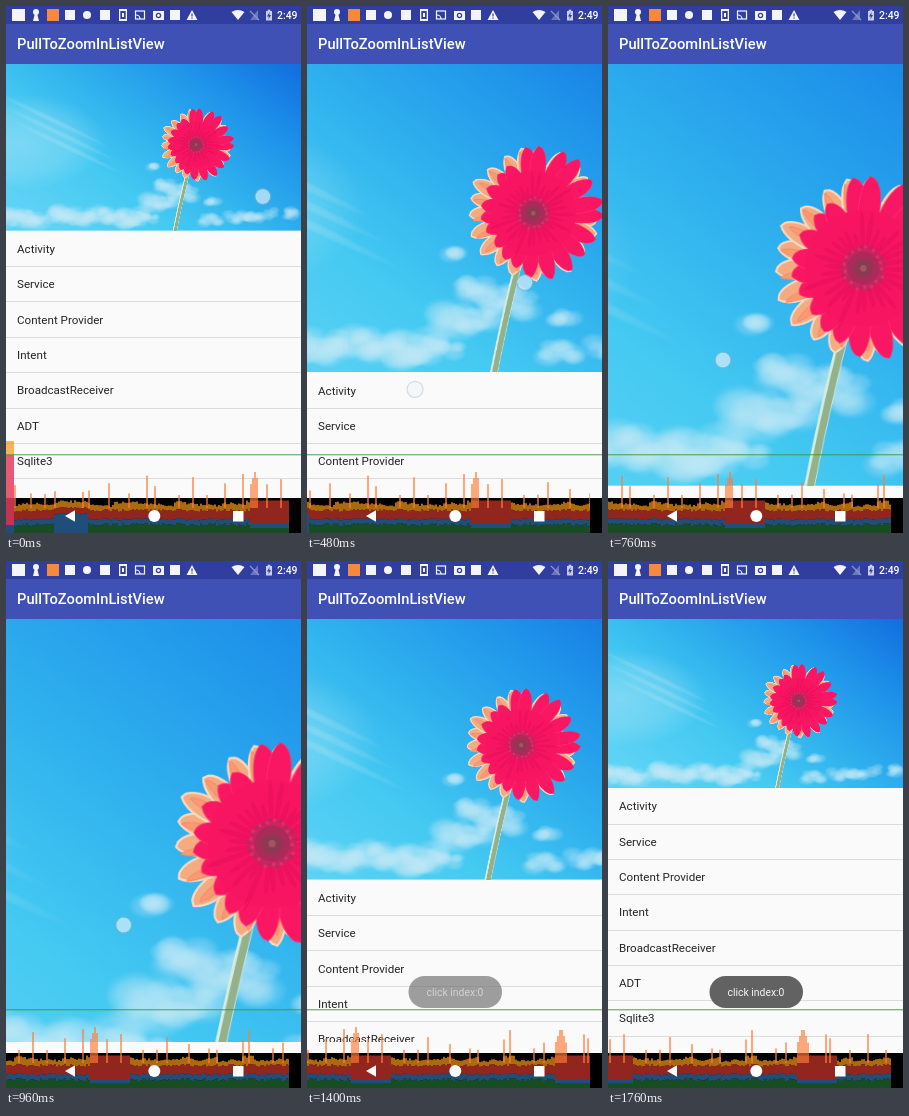
An HTML page with a canvas for the animation above (1.8 s loop, 295 by 527 pixels).

```html
<!DOCTYPE html>
<html lang="en">
<head>
<meta charset="utf-8">
<title>PullToZoomInListView</title>
<style>
html, body { margin: 0; width: 100%; height: 100%; overflow: hidden; background: #000; }
canvas { display: block; width: 295px; height: 527px; }
</style>
</head>
<body>
<canvas id="stage" width="295" height="527"></canvas>
<script>
const W = 295, H = 527, LOOP = 1800, TAU = Math.PI * 2;
const TOP = 58, LIST_END = 481, NAV = 492, PHOTO_H = 166.5, ROW = 35.35;
const RELEASE = 1205, BOUNCE = 903, PEAK = 487;
const FONT = 'Roboto, "Noto Sans", sans-serif';
const ROWS = ['Activity', 'Service', 'Content Provider', 'Intent', 'BroadcastReceiver', 'ADT', 'Sqlite3'];

const g = document.getElementById('stage').getContext('2d');

const noise = n => {
  const v = Math.sin(n * 127.1 + 11.7) * 43758.5453;
  return v - Math.floor(v);
};
const clamp = v => Math.max(0, Math.min(1, v));
const mix = (a, b, k) => a + (b - a) * k;

// Piecewise linear value through [time, value] points.
function track(points, t) {
  let [t0, v0] = points[0];
  for (const [t1, v1] of points) {
    if (t <= t1) return t1 === t0 ? v1 : mix(v0, v1, (t - t0) / (t1 - t0));
    t0 = t1; v0 = v1;
  }
  return v0;
}

function rect(c, color, x, y, w, h) {
  c.fillStyle = color;
  c.fillRect(x, y, w, h);
}

function disc(c, color, x, y, r) {
  c.fillStyle = color;
  c.beginPath();
  c.arc(x, y, r, 0, TAU);
  c.fill();
}

function poly(c, color, ...p) {
  c.fillStyle = color;
  c.beginPath();
  for (let i = 0; i < p.length; i += 2) c.lineTo(p[i], p[i + 1]);
  c.closePath();
  c.fill();
}

function text(str, x, y, size, color, weight = 400, align = 'left') {
  g.font = `${weight} ${size}px ${FONT}`;
  g.textAlign = align;
  g.fillStyle = color;
  g.fillText(str, x, y);
}

// ---- Photo, painted once at triple size ----
function puff(c, x, y, rx, ry, alpha) {
  c.save();
  c.translate(x, y);
  c.scale(rx, ry);
  const grad = c.createRadialGradient(0, 0, 0, 0, 0, 1);
  grad.addColorStop(0, `rgba(196,233,246,${alpha})`);
  grad.addColorStop(0.6, `rgba(190,231,246,${alpha * 0.65})`);
  grad.addColorStop(1, 'rgba(190,233,248,0)');
  c.fillStyle = grad;
  c.fillRect(-1, -1, 2, 2);
  c.restore();
}

// Puffs scattered over an ellipse, one for about every 40 square units.
function cloud(c, x, y, rx, ry) {
  const count = 4 + rx * ry / 13;
  for (let i = 0; i < count; i++) {
    const k = x + y + i * 5, a = noise(k) * TAU, d = Math.sqrt(noise(k + 1)) * 0.85;
    const r = 3 + noise(k + 2) * Math.min(7, ry * 0.7);
    puff(c, x + Math.cos(a) * d * rx, y + Math.sin(a) * d * ry, r * 1.5, r, 0.42);
  }
}

function petal(c, angle, len, half, fill, edge, width) {
  c.save();
  c.rotate(angle);
  c.beginPath();
  c.moveTo(3, 0);
  c.bezierCurveTo(len * 0.4, -half, len * 0.85, -half * 1.5, len, -half * 0.15);
  c.lineTo(len * 0.98, half * 0.25);
  c.bezierCurveTo(len * 0.85, half * 1.5, len * 0.4, half, 3, 0);
  c.fillStyle = fill;
  c.fill();
  c.strokeStyle = edge;
  c.lineWidth = width;
  c.stroke();
  c.restore();
}

function ring(c, count, seed, paint) {
  for (let i = 0; i < count; i++) paint((i + noise(seed + i) * 0.45) / count * TAU, noise(seed + i + 50), i);
}

function flower(c) {
  for (const [color, width, dx] of [['#d5ecdf', 4.2, 0], ['#93b28c', 2.8, 0.4]]) {
    c.strokeStyle = color;
    c.lineWidth = width;
    c.beginPath();
    c.moveTo(184 + dx, 100);
    c.quadraticCurveTo(176 + dx, 130, 168.5 + dx, 168);
    c.stroke();
  }
  c.save();
  c.translate(190, 80.6);
  ring(c, 21, 4, (a, n) => petal(c, a, 34 + n * 3.4, 4.2, '#f5ab80', '#f9d9c2', 0.8));
  ring(c, 21, 30, (a, n) => petal(c, a, 31 + n * 3, 1.6, '#fb9a72', 'rgba(240,110,90,.4)', 0.4));
  // Front petals reach the rim on the right and stop short on the left.
  ring(c, 21, 9, (a, n) => {
    const reach = 27 + 8.5 * clamp((Math.cos(a) + 0.55) / 0.55);
    petal(c, a, reach + n * 3, 4.3, '#f91663', 'rgba(250,50,110,.8)', 0.4);
  });
  disc(c, '#f71562', 0, 0, 23);
  ring(c, 30, 70, (a, n) => petal(c, a, 14 + n * 12, 0.8, 'rgba(220,14,88,.35)', 'rgba(220,14,88,.2)', 0.3));
  disc(c, '#cf2260', 0, 0, 8.6);
  ring(c, 34, 90, (a, n, i) => {
    const r = 6.8 + n * 2.2;
    disc(c, i % 2 ? '#b52a5c' : '#dd3068', Math.cos(a) * r, Math.sin(a) * r, 0.7);
  });
  disc(c, '#aa2b59', 0, 0, 6.4);
  disc(c, '#8c3a53', 0, 0, 3.6);
  disc(c, '#a05560', 0, 0, 1.3);
  c.restore();
}

function makePhoto() {
  const cv = document.createElement('canvas');
  cv.width = W * 3;
  cv.height = Math.round(PHOTO_H * 3);
  const c = cv.getContext('2d');
  c.scale(3, 3);
  const sky = c.createLinearGradient(70, 175, 235, -40);
  ['#5cd2f5', '#45caf2', '#2fb0ee', '#1f93ea', '#1270e0'].forEach((s, i) => sky.addColorStop(i / 4, s));
  rect(c, sky, 0, 0, W, PHOTO_H);
  puff(c, 15, 78, 85, 48, 0.4);
  c.save();
  c.translate(55, 70);
  c.rotate(0.45);
  for (let i = -1; i < 2; i++) puff(c, i * 12, i * 9, 62, 3, 0.28);
  c.restore();
  // Main cloud, its small neighbours, then the low bank.
  cloud(c, 163, 120, 15, 6);
  cloud(c, 177, 129, 17, 8);
  cloud(c, 152, 138, 18, 8);
  cloud(c, 148, 103, 4, 3);
  cloud(c, 206, 137, 6, 3);
  for (let x = 5; x < 140; x += 22) cloud(c, x, 155 - noise(x) * 5, 17, 8);
  for (let x = 205; x < W; x += 24) cloud(c, x, 156 - (x - 205) * 0.1, 15, 5);
  flower(c);
  return cv;
}
const photo = makePhoto();

// ---- Motion ----
const PULL = [[0, PHOTO_H], [280, 241], [480, 308], [760, 422], [1040, 481], [1200, PEAK]];

function photoHeight(t) {
  if (t < RELEASE) return track(PULL, t);
  const left = 1 - clamp((t - RELEASE) / BOUNCE);
  return PHOTO_H + (PEAK - PHOTO_H) * left ** 5;
}

function touch(t, t0, t1, x0, y0, x1, y1) {
  if (t < t0 || t > t1) return;
  const k = (t - t0) / (t1 - t0), x = mix(x0, x1, k), y = mix(y0, y1, k);
  disc(g, 'rgba(238,246,250,.62)', x, y, 7.5);
  g.strokeStyle = 'rgba(160,175,185,.4)';
  g.lineWidth = 1.2;
  g.beginPath();
  g.arc(x, y, 8, 0, TAU);
  g.stroke();
}

// Two fingers take turns pulling down.
function drawTouches(t) {
  touch(t, 0, 300, 257, 190, 202, 352);
  touch(t, 280, 500, 77, 249, 111, 396);
  touch(t, 480, 700, 218, 276, 200, 385);
  touch(t, 640, 760, 112, 250, 115, 354);
  touch(t, 760.1, RELEASE, 115, 354, 121, 376);
}

// ---- Screen parts ----
function drawList(t) {
  const h = photoHeight(t), s = h / PHOTO_H, edge = TOP + h;
  rect(g, '#fafafa', 0, TOP, W, NAV - TOP);
  g.save();
  g.beginPath();
  g.rect(0, TOP, W, LIST_END - TOP);
  g.clip();
  g.drawImage(photo, W / 2 - W * s / 2, TOP, W * s, h);
  ROWS.forEach((name, i) => {
    const y = edge + i * ROW;
    text(name, 11, y + 22.2, 11.6, '#242424');
    rect(g, '#dcdedd', 0, Math.round(y + ROW), W, 1);
  });
  g.restore();
}

function drawStatus() {
  const w = '#f4f5fb', bar = '#303f9f';
  rect(g, '#3f51b5', 0, 0, W, TOP);
  rect(g, bar, 0, 0, W, 18);
  g.strokeStyle = w;
  g.lineWidth = 1.2;
  // plain marks
  rect(g, w, 6, 3, 13, 12);
  rect(g, '#f58a3c', 41, 3, 12, 12);
  for (const x of [59, 94, 164]) rect(g, w, x, 4, 10, 10);
  disc(g, w, 81, 9, 4);
  // keyhole
  disc(g, w, 30, 6, 3);
  poly(g, w, 29, 7, 31, 7, 33, 15, 27, 15);
  // phone
  rect(g, w, 113, 3, 8, 12);
  rect(g, bar, 114.3, 5, 5.4, 8);
  rect(g, w, 116, 7, 2, 4);
  // cast
  g.strokeRect(129.5, 5, 9, 8);
  g.beginPath();
  g.arc(130, 13, 4, -Math.PI / 2, 0);
  g.stroke();
  // camera
  rect(g, w, 147, 5, 11, 9);
  disc(g, bar, 152.5, 9.5, 2.7);
  disc(g, w, 152.5, 9.5, 1.4);
  // warning
  poly(g, w, 186, 4, 191.5, 14, 180.5, 14);
  rect(g, bar, 185.4, 7.5, 1.2, 3);
  rect(g, bar, 185.4, 11.5, 1.2, 1.2);
  // wifi
  g.fillStyle = w;
  g.beginPath();
  g.moveTo(232, 14);
  g.lineTo(225.5, 6);
  g.quadraticCurveTo(232, 1.8, 238.5, 6);
  g.fill();
  // no signal
  poly(g, '#6d78bb', 244, 14, 252, 14, 252, 4);
  g.strokeStyle = '#8d96cb';
  g.beginPath();
  g.moveTo(244, 5);
  g.lineTo(253, 14);
  g.stroke();
  // battery
  rect(g, '#c9cee9', 260, 5, 6, 9.5);
  rect(g, '#c9cee9', 261.7, 3.7, 2.6, 1.5);
  poly(g, bar, 263.6, 6, 261, 10.5, 262.8, 10.5, 262.4, 13.5, 265, 9, 263.3, 9);
  text('2:49', 271, 13, 10.4, '#fff', 500);
  text('PullToZoomInListView', 11, 43.4, 14.7, '#fff', 500);
}

// ---- Frame-time bars, scrolling left while frames are drawn ----
const SCROLL = [[0, 0], [1000, 167], [1200, 167], [1800, 265]];
const ORANGE = 'rgba(245,150,20,.7)', RED = 'rgba(205,55,42,.7)';
const BLUE = 'rgba(50,120,190,.65)', GREEN = 'rgba(35,110,50,.7)';
const SPIKE = 'rgba(255,125,55,.65)';

// A long frame every 205 units: a solid run led by a tall cluster.
const sinceLong = x => x < 243 ? -1 : (x - 243) % 205;

// Height above the bar edge: mostly none, now and then a spike.
function spikeHeight(x) {
  const d = sinceLong(x);
  if (d >= 0 && d < 9) return 26 - Math.abs(d - 5) * 3;
  const cell = Math.floor(x / 16), at = Math.floor(noise(cell) * 7) * 2;
  return x - cell * 16 === at ? 3 + 22 * noise(cell + 0.5) ** 2 : 0;
}

function drawBars(t) {
  const shift = Math.round(track(SCROLL, t));
  g.save();
  g.beginPath();
  g.rect(0, 400, 283, H - 400);
  g.clip();
  for (let wx = Math.floor(shift / 2) * 2; wx < shift + 283; wx += 2) {
    const x = wx - shift, d = sinceLong(wx);
    const stack = (...parts) => {
      for (let i = 0; i < parts.length - 1; i += 2) {
        rect(g, parts[i + 1], x, parts[i], 2, (parts[i + 2] || H) - parts[i]);
      }
    };
    const group = noise(Math.floor(wx / 12) + 0.2) * 5, jag = noise(wx) * 4;
    if (wx < 8) stack(435, ORANGE, 449, 'rgba(232,62,92,.85)', 519, BLUE);
    else if (d >= 0 && d < 40) stack(494.5, RED, 518, BLUE, 522, GREEN);
    else if (wx >= 47 && wx < 82) stack(494 + jag, ORANGE, 501 + jag / 2, RED, 507 + jag / 2, BLUE);
    else stack(494 + group + jag * 0.6, ORANGE, 503 + jag * 0.7, RED, 512 + jag * 0.6, BLUE, 517 + jag * 0.8, GREEN);
    const h = spikeHeight(wx);
    if (h) rect(g, SPIKE, x, NAV - h, 2, h + 10);
  }
  g.restore();
  rect(g, 'rgba(60,150,60,.65)', 0, 448, W, 1.4);
}

function drawNav() {
  poly(g, '#fff', 59, 510, 69, 504.3, 69, 515.7);
  disc(g, '#fff', 148.3, 510, 6);
  rect(g, '#fff', 227, 505, 10.5, 10.5);
}

function drawToast(t) {
  const a = clamp((t - 1310) / 150);
  if (!a) return;
  g.globalAlpha = a;
  g.fillStyle = '#626262';
  g.beginPath();
  g.arc(117.5, 431, 16, Math.PI / 2, Math.PI * 1.5);
  g.arc(179, 431, 16, -Math.PI / 2, Math.PI / 2);
  g.fill();
  text('click index:0', 148, 434.8, 10.4, '#f4f4f4', 400, 'center');
  g.globalAlpha = 1;
}

function draw(t) {
  rect(g, '#000', 0, 0, W, H);
  drawList(t);
  drawStatus();
  drawToast(t);
  drawTouches(t);
  drawBars(t);
  drawNav();
}

const start = performance.now();
function tick() {
  draw((performance.now() - start) % LOOP);
  requestAnimationFrame(tick);
}
tick();
</script>
</body>
</html>
```
